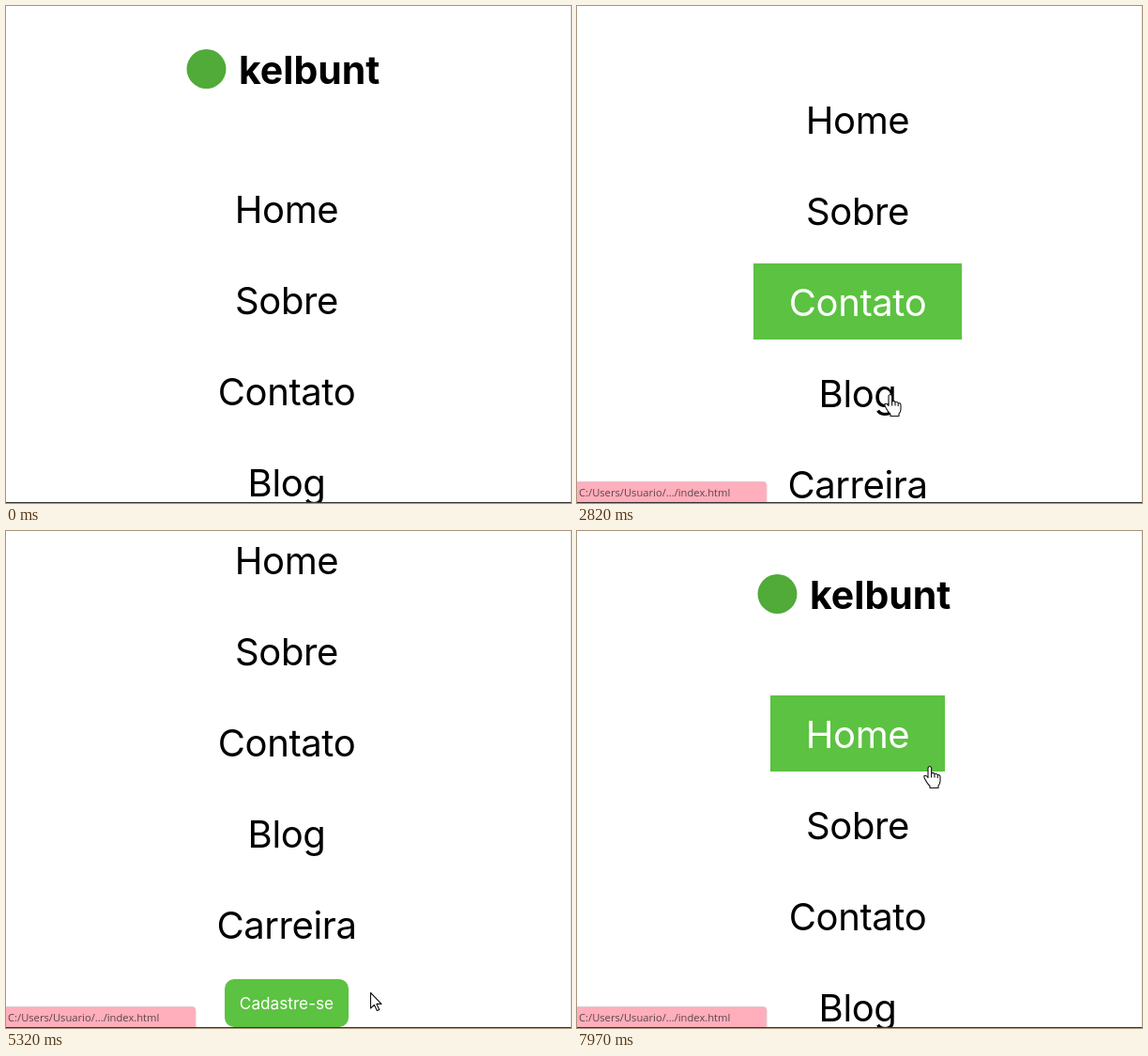
These frames come from a looping animation (602 px wide and 529 px high, 8 s). An HTML page:

```html
<!DOCTYPE html>
<html lang="pt">
<head>
<meta charset="utf-8">
<title>Menu</title>
<style>
html, body { margin: 0; width: 100%; height: 100%; overflow: hidden; background: #fff; }
svg { display: block; width: 100%; height: 100%; }
text { font-family: Inter, sans-serif; }
.link { font-size: 40px; letter-spacing: -.4px; text-anchor: middle; }
.brand { font-size: 41px; font-weight: 700; }
.button { font-size: 17.2px; text-anchor: middle; fill: #fff; }
.status { font-family: "Open Sans", "Noto Sans", sans-serif; font-size: 11.2px; fill: #5b454b; }
.cursor { fill: #fff; stroke: #111; stroke-width: 1.1; stroke-linejoin: round; }
</style>
</head>
<body>
<svg viewBox="0 0 602 529">
  <g id="page">
    <circle cx="213.5" cy="67" r="21" fill="#50ab39"/>
    <text class="brand" x="248" y="83">kelbunt</text>
    <g id="menu"></g>
    <rect x="233" y="662" width="132" height="51" rx="10" fill="#5cc241"/>
    <text class="button" x="299" y="694">Cadastre-se</text>
  </g>
  <path d="M601.5 0V529" stroke="#ececec"/>
  <g id="status">
    <path d="M-1 506.5H198.500q3.500 0 3.500 3.500V529H-1z" fill="#ffaebb" stroke="#dfc6cb"/>
    <text class="status" x="2" y="522">C:/Users/Usuario/.../index.html</text>
  </g>
  <path d="M0 528.5H602" stroke="#333"/>
  <g id="cursor" class="cursor">
    <path id="arrow" d="M.5.5v16.500l3.900-3.700 2.900 6.200 2.500-1.100-2.900-6h5.100z"/>
    <path id="hand" d="M-2 2q1.800-3 3.600 0v6q2-1.600 3.400.6q2-1 3.200 1q2.800-.4 2.800 2.400v4q0 3-2 5v2.500h-9v-2q-3-3-5-7q-1.800-3-.8-4q2-1 3.800 2zM1.600 8v4.500M5 9v3.500M8.200 10v3"/>
  </g>
</svg>
<script>
const LOOP = 8000, STEP = 68.2, FADE = 170, SAMPLES = 17;
const CENTER = 299, PITCH = 97, HEIGHT = 81;
const $ = id => document.getElementById(id);

const ramp = (t, from, to) => Math.min(1, Math.max(0, (t - from) / (to - from)));
const wheel = (t, from) => 1 - (1 - ramp(t, from, from + 460)) ** 2;
const scroll = t => Math.round(185 * (wheel(t, 2657) - wheel(t, 6983)));
const statusOpacity = t => ramp(t, 1570, 1710) - ramp(t, 5450, 5660) + ramp(t, 6990, 7120);

// Pointer trips between rests; bend bows the path sideways.
const enter = { x: 505, y: 501 };
const trips = [
  { from: 470, to: 1220, x: 345, y: 249, bend: -80 },
  { from: 1600, to: 2430, x: 334, y: 413, bend: -26 },
  { from: 3470, to: 3820, x: 358, y: 346, bend: 0 },
  { from: 4024, to: 4800, x: 342, y: 506, bend: 0 },
  { from: 5040, to: 5310, x: 388, y: 491, bend: 0 },
  { from: 6200, to: 6880, x: 393, y: 452, bend: 0 },
  { from: 7450, to: 7800, x: 376, y: 250, bend: 20 }
];

function pointer(t) {
  const i = trips.findLastIndex(trip => trip.from <= t);
  if (i < 0) return null;
  const a = trips[i - 1] || enter, b = trips[i], u = ramp(t, b.from, b.to);
  return {
    x: a.x + (b.x - a.x) * u + 2 * u * (1 - u) * b.bend,
    y: a.y + (b.y - a.y) * u,
    pageTop: scroll(b.from) // hover stays stale until the pointer moves again
  };
}

function make(tag, attrs) {
  const el = document.createElementNS("http://www.w3.org/2000/svg", tag);
  for (const k in attrs) el.setAttribute(k, attrs[k]);
  return $("menu").appendChild(el);
}

const links = [["Home", 186], ["Sobre", 188], ["Contato", 222], ["Blog", 162], ["Carreira", 226]]
  .map(([name, w], i) => {
    const x = CENTER - w / 2, y = 175 + PITCH * i;
    const box = make("rect", { x, y, width: w, height: HEIGHT, fill: "#5cc241" });
    const label = make("text", { class: "link", x: CENTER, y: y + 56 });
    label.textContent = name;
    return { x, y, w, h: HEIGHT, box, label };
  });
const button = { x: 233, y: 662, w: 132, h: 51 };

function hovered(t) {
  const p = pointer(t);
  if (!p) return null;
  const y = p.y + p.pageTop;
  return [...links, button].find(b => p.x >= b.x && p.x <= b.x + b.w && y >= b.y && y <= b.y + b.h);
}

function draw(t) {
  // A link's highlight is the share of the last FADE ms it was hovered.
  const recent = Array.from({ length: SAMPLES }, (_, i) => hovered(t - i * FADE / SAMPLES));
  for (const link of links) {
    const lit = recent.filter(b => b === link).length / SAMPLES;
    const c = Math.round(255 * lit);
    link.box.setAttribute("opacity", lit);
    link.label.setAttribute("fill", `rgb(${c},${c},${c})`);
  }
  $("page").setAttribute("transform", `translate(0 ${-scroll(t)})`);
  $("status").setAttribute("opacity", statusOpacity(t));

  const p = pointer(t);
  $("cursor").setAttribute("visibility", p ? "visible" : "hidden");
  if (p) $("cursor").setAttribute("transform", `translate(${Math.round(p.x)} ${Math.round(p.y)})`);
  $("hand").setAttribute("display", recent[0] ? "inline" : "none");
  $("arrow").setAttribute("display", recent[0] ? "none" : "inline");
}

// The picture advances in steps, like a screen recording.
const start = performance.now();
function tick() {
  const t = (performance.now() - start) % LOOP;
  draw(Math.floor(t / STEP + .18) * STEP);
  requestAnimationFrame(tick);
}
draw(0);
requestAnimationFrame(tick);
</script>
</body>
</html>
```
